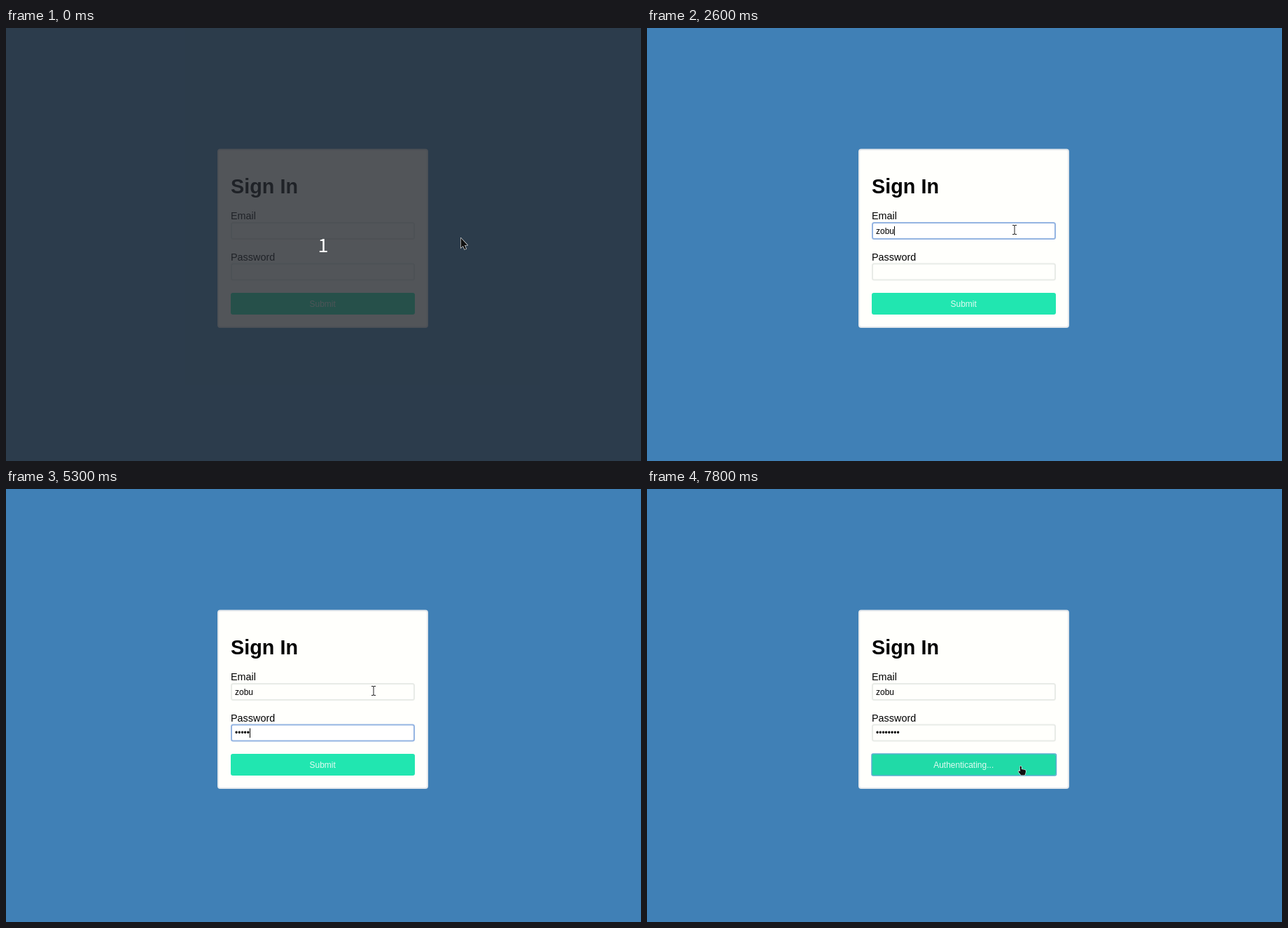
Recreate the animation shown at these times as an HTML page. Size 907 by 618 pixels, loop 8 s.

```html
<!DOCTYPE html>
<html lang="en">
<head>
<meta charset="utf-8">
<title>Sign In</title>
<style>
  html, body { margin: 0; width: 100%; height: 100%; overflow: hidden; background: #4080b6; }
  svg { display: block; width: 907px; height: 618px; font-family: "Liberation Sans", Arial, sans-serif; }
  .field { fill: #fffffc; stroke: #e8ebe7; stroke-width: 2; }
  .field.focus { fill: #fff; stroke: #94b4e2; }
  .label { font-size: 14.4px; }
  .small { font-size: 12px; }
  .mid { text-anchor: middle; }
  .cursor { fill: #111; stroke: #fff; stroke-width: 1.2; stroke-linejoin: round; paint-order: stroke; }
</style>
</head>
<body>
<svg viewBox="0 0 907 618">
  <rect width="907" height="618" fill="#4080b6"/>
  <rect x="303" y="173.5" width="299" height="253.5" rx="3" fill="#fffffc" stroke="#e4e8ec" stroke-width="2"/>
  <text x="321" y="236" font-size="28.8" font-weight="bold">Sign In</text>
  <text class="label" x="321" y="273">Email</text>
  <text class="label" x="321" y="332">Password</text>
  <rect id="email" class="field" x="322" y="278" width="261" height="23" rx="2.5"/>
  <rect id="password" class="field" x="322" y="336.5" width="261" height="23" rx="2.5"/>
  <text id="user" class="small" x="327" y="294"></text>
  <text id="dots" class="small" x="327" y="352"></text>
  <rect id="caret" width="1"/>
  <rect id="button" x="321" y="378" width="263" height="31" rx="3"/>
  <rect id="ring" x="321" y="378" width="263.5" height="31" rx="2" fill="none" stroke="#5aaed0" stroke-width="1.5"/>
  <text id="action" class="small mid" x="452.2" y="398" fill="#e2fbf2"></text>
  <g id="countdown">
    <rect width="907" height="618" fill="#272b31" fill-opacity=".8"/>
    <text class="mid" x="453" y="319.5" font-size="27" fill="#fff"
      style="font-family:'Noto Sans CJK JP','Noto Sans CJK SC','Noto Sans CJK','DejaVu Sans',sans-serif">1</text>
  </g>
  <g id="mouse">
    <path id="arrow" class="cursor" d="M0 0V14.3L3.2 11.3L5.4 16.4L7.7 15.4L5.5 10.4H9.6Z"/>
    <g id="beam" fill="none">
      <path d="M-3-6.5H3M0-6.5V6.5M-3 6.5H3" stroke="#fff" stroke-width="2.6"/>
      <path d="M-3-6.5H-1L0-5.8L1-6.5H3M0-6V6M-3 6.5H-1L0 5.8L1 6.5H3" stroke="#222"/>
    </g>
    <path id="hand" class="cursor" d="M-1 .8Q.4-.8 1.4 1V4.6L6 5.3Q7.8 5.7 7.5 7.6L7 10.4L6 13H.8L-2.8 8.4Q-3.4 6.6-2 6.7L-.4 7.6Z"/>
  </g>
</svg>
<script>
const LOOP = 8000, TICK = 100;
const USER = "zobu";
const el = id => document.getElementById(id);
const show = (id, on) => el(id).setAttribute("visibility", on ? "visible" : "hidden");
const put = (id, attrs) => Object.entries(attrs).forEach(([k, v]) => el(id).setAttribute(k, v));

// Each step changes part of the state and holds until the next one.
const steps = [
  [0, { countdown: true, focus: "", typed: 0, dots: 0, caret: false, action: "Submit" }],
  [500, { countdown: false }],
  [1300, { focus: "email", caret: true }],
  [1900, { caret: false }],
  [2100, { typed: 1, caret: true }],
  [2200, { typed: 2 }],
  [2500, { typed: 3 }],
  [2600, { typed: 4 }],
  [3200, { caret: false }],
  [3600, { focus: "password", caret: true }],
  [4200, { caret: false }],
  [4500, { dots: 1, caret: true }],
  [4700, { dots: 2 }],
  [4900, { dots: 3 }],
  [5000, { dots: 4 }],
  [5300, { dots: 5 }],
  [5400, { dots: 6 }],
  [5500, { dots: 7 }],
  [5700, { dots: 8 }],
  [6300, { caret: false }],
  [6800, { caret: true }],
  [7500, { focus: "button", caret: false }],
  [7600, { action: "Authenticating..." }]
];

const path = [
  [600, 649.6, 299.6], [700, 609, 296], [800, 560, 289], [900, 532, 287],
  [1200, 532, 287], [1300, 525, 288], [6200, 525, 288], [6300, 526, 301],
  [6400, 529, 340], [6500, 532, 380], [6600, 533.5, 395.5]
];
const tint = [
  [6500, 33, 230, 176], [6800, 36, 240, 185], [7400, 36, 240, 185], [7800, 32, 218, 167]
];

function sample(keys, t) {
  const i = keys.findIndex(k => k[0] > t);
  if (i === 0) return keys[0].slice(1);
  if (i < 0) return keys[keys.length - 1].slice(1);
  const a = keys[i - 1], b = keys[i], p = (t - a[0]) / (b[0] - a[0]);
  return a.slice(1).map((v, n) => v + (b[n + 1] - v) * p);
}

function cursorAt(x, y) {
  if (x < 321 || x > 584) return "arrow";
  if (y >= 378 && y <= 409) return "hand";
  return (y >= 277 && y <= 302) || (y >= 335 && y <= 361) ? "beam" : "arrow";
}

function draw(ms) {
  const t = Math.floor(ms / TICK) * TICK;
  const s = Object.assign({}, ...steps.filter(k => k[0] <= t).map(k => k[1]));
  const inEmail = s.focus === "email";

  show("countdown", s.countdown);
  for (const id of ["email", "password"]) el(id).classList.toggle("focus", s.focus === id);
  el("user").textContent = USER.slice(0, s.typed);
  el("dots").textContent = "•".repeat(s.dots);
  el("action").textContent = s.action;

  const typed = inEmail ? el("user") : el("dots");
  const width = typed.textContent ? typed.getComputedTextLength() : 0;
  put("caret", { x: Math.floor(327.35 + width), y: inEmail ? 283 : 341.5, height: inEmail ? 13 : 13.5 });
  show("caret", s.caret);

  put("button", { fill: `rgb(${sample(tint, t).map(Math.round)})` });
  show("ring", s.focus === "button");

  const [x, y] = sample(path, t), kind = cursorAt(x, y);
  put("mouse", { transform: `translate(${x} ${y})` });
  for (const id of ["arrow", "beam", "hand"]) show(id, id === kind);
}

const start = performance.now();
function frame() {
  draw((performance.now() - start) % LOOP);
  requestAnimationFrame(frame);
}
frame();
</script>
</body>
</html>
```
